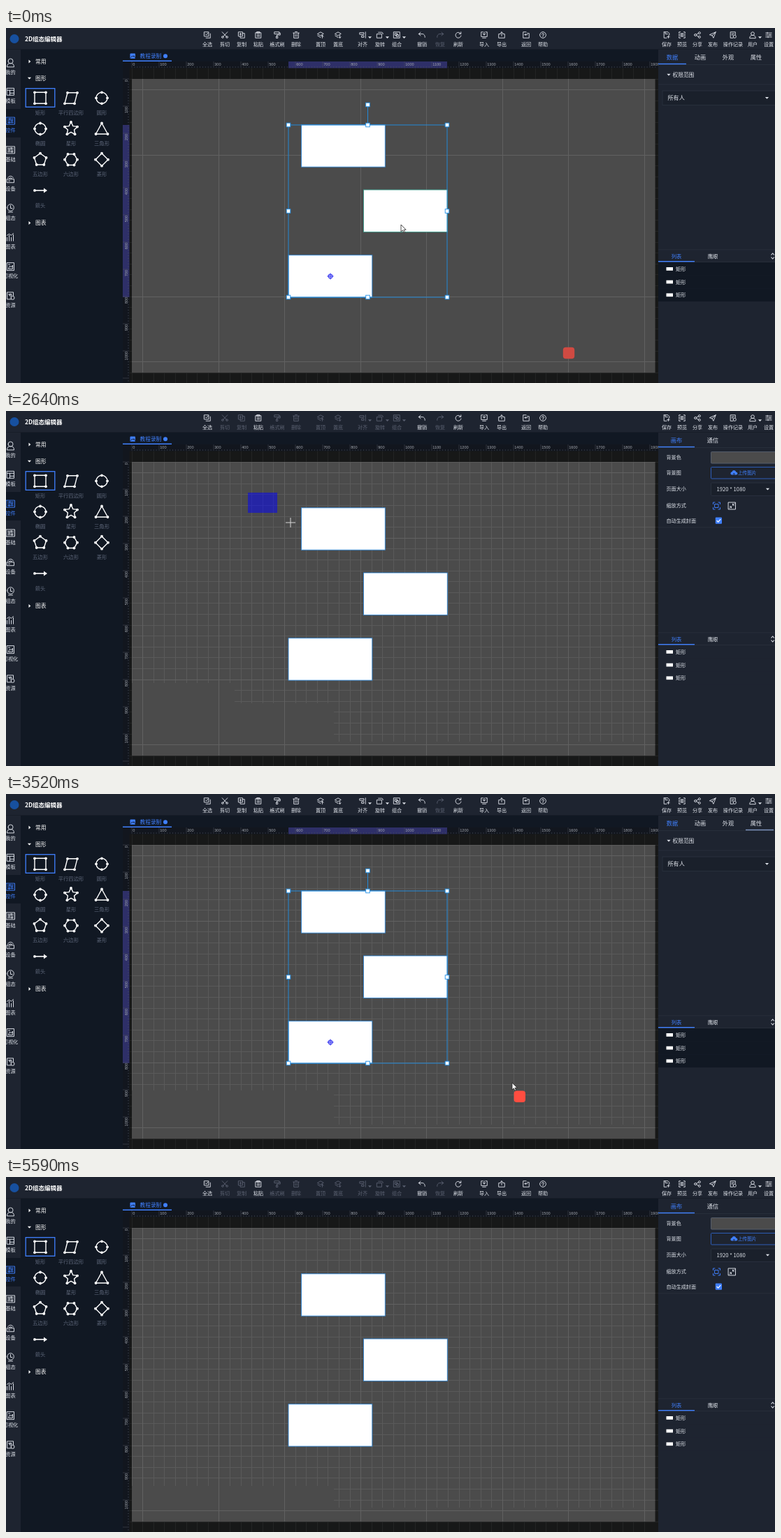
Write an HTML page that moves like this. It is 1100 px wide and 509 px high and loops after 6640 ms.

```html
<!DOCTYPE html>
<html lang="zh-CN">
<head>
<meta charset="utf-8">
<title>2D组态编辑器</title>
<style>
html, body { margin: 0; width: 100%; height: 100%; overflow: hidden; background: #1e2430; }
svg { display: block; width: 100vw; height: 100vh; }
text { font-family: "Noto Sans CJK SC", "Noto Sans CJK", "Noto Sans", sans-serif; }
.ruler text { font-family: "Liberation Sans", sans-serif; }
.icon { fill: none; stroke: #dfe3ea; stroke-width: .95; stroke-linejoin: round; stroke-linecap: round; }
</style>
</head>
<body>
<svg id="stage" viewBox="0 0 1100 509" preserveAspectRatio="none"></svg>
<script>
const BLUE = '#4080ff', BAR = '#1e2430', DARK = '#111823', INK = '#dfe3ea', MUTED = '#5d6679';
const LOOP = 6640, UNIT = 0.39, OX = 180, OY = 73, CELL = 15.6;

const rect = (x, y, w, h, fill, extra = '') =>
  `<rect x="${x}" y="${y}" width="${w}" height="${h}" fill="${fill}" ${extra}/>`;
const text = (x, y, s, size = 7.4, fill = INK, anchor = 'start', extra = '') =>
  `<text x="${x}" y="${y + size * .37}" font-size="${size}" fill="${fill}" text-anchor="${anchor}" ${extra}>${s}</text>`;
const mid = (x, y, s, size, fill) => text(x, y, s, size, fill, 'middle');
const path = (d, stroke, width = 1, fill = 'none') =>
  `<path d="${d}" stroke="${stroke}" stroke-width="${width}" fill="${fill}"/>`;
const ring = (x, y, r) => `M${x - r} ${y}a${r} ${r} 0 1 0 ${2 * r} 0a${r} ${r} 0 1 0 ${-2 * r} 0`;
const icon = (x, y, d, color = INK, s = 1) =>
  `<path class="icon" transform="translate(${x} ${y}) scale(${s})" style="stroke:${color}" d="${d}"/>`;
const group = (id, body, extra = '') => `<g id="${id}" ${extra}>${body}</g>`;
const range = n => [...Array(n).keys()];
const caret = (x, y, c = INK) => `<path d="M${x - 2.6} ${y - 1.3}h5.2l-2.6 2.8z" fill="${c}"/>`;

const tools = [
  [288, '全选', 'M-4.5-4.5h6.5v6.5h-6.5zM-2 4.5h6.5v-6.5M-3-1.5l1.5 1.5 2.5-3'],
  [313, '剪切', 'M-4-4.5L2.5 2.5M4-4.5L-2.5 2.5' + ring(-3.3, 3.2, 1.4) + ring(3.3, 3.2, 1.4), 1],
  [337, '复制', 'M-4.5-4.5h6v6.5h-6zM-2 2v2.5h6.5v-7h-3M-3-1.2h3M-1.5-2.7v3', 1],
  [361, '粘贴', 'M-4-3.5h8v8h-8zM-2-4.8h4v2.4h-4zM-2 0h4M-2 2h4'],
  [388, '格式刷', 'M-4-4.5h7v3h-7zM3-3h1.5v3h-5v2M-1.2 2h2v2.8h-2z', 1],
  [415, '删除', 'M-4.5-3h9M-1.5-4.8h3M-3.5-3v7.6h7v-7.6M-1.2-.8v3M1.2-.8v3', 1],
  [450, '置顶', 'M-4.5-1.8l4.5-2.6 4.5 2.6-4.5 2.6zM-4.5 1l4.5 2.8M2.7 4.6v-4m-1.6 1.6l1.6-1.6 1.6 1.6', 1],
  [475, '置底', 'M-4.5-1.8l4.5-2.6 4.5 2.6-4.5 2.6zM-4.5 1l4.5 2.8M2.7.6v4m-1.6-1.6l1.6 1.6 1.6-1.6', 1],
  [510, '对齐', 'M4.5-4.5v9M-4-3.5h6v2.6h-6zM-1 1h3v2.6h-3z', 2],
  [535, '旋转', 'M-4.5-1.5h7v6h-7zM-2.5-4h5q2 0 2 2.5', 2],
  [559, '组合', 'M-4.5-4.5h9v9h-9zM-2.5-2.5h3v3h-3zM-.5-.5h3v3h-3z', 2],
  [595, '撤销', 'M-2-4l-3 2.5 3 2.5M-5-1.5h6q3.5.5 3.5 5'],
  [621, '恢复', 'M2-4l3 2.5-3 2.5M5-1.5h-6q-3.5.5-3.5 5', 3],
  [647, '刷新', 'M3.6-2a4.2 4.2 0 1 0 .6 3M4-4.5v2.8h-2.8'],
  [684, '导入', 'M-2-4.5h-2.5v7h9v-7h-2.500M0-4.5v4.500m-2-2l2 2 2-2M-2.500 4.500h5'],
  [709, '导出', 'M-2-1.500h-2.500v6h9v-6h-2.500M0 1.500v-6m-2 2l2-2 2 2'],
  [744, '返回', 'M0-4.500h-4.500v9h9v-7h-3M2-.5h-4m1.500-1.500l-1.500 1.500 1.500 1.500'],
  [768, '帮助', ring(0, 0, 4.6) + 'M-1.500-1a1.500 1.500 0 1 1 1.500 1.600v.8M0 2.600v.2'],
  [945, '保存', 'M-4-4.500h6l2 2v3M0 4.500h-4v-9M-2-4.500v3h3.500M2.600 1v3.600M.8 2.800h3.600'],
  [967, '预览', 'M-5 0q5-5 10 0-5 5-10 0' + ring(0, 0, 1.5) + 'M-4.500-2.500v-2h2M4.500-2.500v-2h-2M-4.500 2.500v2h2M4.500 2.500v2h-2'],
  [989, '分享', ring(-3, 0, 1.6) + ring(3, -3, 1.6) + ring(3, 3, 1.6) + 'M-1.600-.7l3.200-1.600M-1.600.7l3.200 1.600'],
  [1011, '发布', 'M-4.500-.5l9-4-3.500 9-2-3.500zM-1 1l5.500-5.500'],
  [1040, '操作记录', 'M0 4.500h-4v-9h7.500v4M-2-2h3.500M-2 0h2' + ring(2.4, 2.4, 2.2)],
  [1068, '用户', ring(0, -2, 2.5) + 'M-4.500 4.500q0-4 4.500-4 4.500 0 4.500 4z', 4],
  [1091, '设置', 'M-4.500-3h9M-4.500 0h9M-4.500 3h9M-2-4v2M2-1v2M-1 2v2']
];

function toolbar(active) {
  return tools.map(([x, name, d, kind]) => {
    const off = kind === 3 || (!active && (kind === 1 || kind === 2));
    const c = off ? '#5a6070' : INK;
    return icon(x, 10, d, c, .95) + mid(x, 23.5, name, 7.1, c) +
      (kind === 2 || kind === 4 ? caret(x + 10.5, 13.5, c) : '');
  }).join('');
}

const rail = [
  ['我的', ring(0, -2, 3.5) + 'M-5 6q0-5 5-5t5 5z'],
  ['模板', 'M-5-5h10v10h-10zM-5-2h10M-1-2v7M-1 2h6'],
  ['控件', 'M-6-5h12v10h-12zM-4-2.500h8M-4 0h8M-4 2.500h8M-1-3.500v2M2-1v2M-2 1.500v2'],
  ['基础', 'M-6-5h12v10h-12zM-4-2.500h8M-4 0h8M-4 2.500h8M1-3.500v2M-2-1v2M2 1.500v2'],
  ['设备', 'M-5 0h10v5h-10zM-3 2.500h2M-4-2q4-5 8 0M-2-1q2-2 4 0'],
  ['组态', ring(0, -1, 4.8) + 'M0-4v4h2.500M-3 5.500h6'],
  ['图表', 'M-5 5v-5M-2 5v-8M1 5v-5M4 5v-9M-5-3l3-2 3 2 3-3'],
  ['可视化', 'M-5-5.500h10v11h-10zM-3 3l2-4 2 2 2-3v5zM-3-3h2'],
  ['资源', 'M1 5h-6v-10h9v5M-3-2h4' + ring(3, 3, 2.5) + ring(0, -1, 1.5)]
];

const polar = (n, r, a0 = -90) => range(n).map(i => {
  const a = (a0 + 360 * i / n) * Math.PI / 180;
  return [r * Math.cos(a), r * Math.sin(a)];
});
const dots = pts => pts.map(([x, y]) => `<circle cx="${x}" cy="${y}" r="1.9" fill="#fff"/>`).join('');
const poly = pts => `<polygon points="${pts.join(' ')}" fill="none" stroke="#fff" stroke-width="1.4"/>`;
const nodes = pts => poly(pts) + dots(pts);
const round = path(ring(0, 0, 8), '#fff', 1.4) + dots(polar(4, 8));
const star = polar(5, 10).flatMap((p, i) => [p, polar(5, 4.8, -54)[i]]);
const shapes = [
  ['矩形', nodes([[-8, -8], [8, -8], [8, 8], [-8, 8]])],
  ['平行四边形', nodes([[-5, -7.5], [9, -7.5], [5, 8], [-9, 8]])],
  ['圆形', round], ['椭圆', round],
  ['星形', poly(star) + dots(polar(5, 9.5))],
  ['三角形', nodes([[0, -8], [8.500, 7.500], [-8.500, 7.500]])],
  ['五边形', nodes(polar(5, 9))],
  ['六边形', nodes(polar(6, 9, 0))],
  ['菱形', nodes(polar(4, 9))],
  ['箭头', path('M-8 0H6', '#fff', 1.6) + dots([[-8, 0]]) + '<path d="M5-3.500L10 0 5 3.500z" fill="#fff"/>']
];

function leftSide() {
  let s = rect(0, 31, 21, 478, BAR) + rect(21, 31, 146, 478, DARK) + rect(0, 116, 21, 41, DARK);
  rail.forEach(([name, d], i) => {
    const y = 49.5 + 41.8 * i, c = i === 2 ? BLUE : INK;
    s += icon(6.5, y, d, c) + mid(6.5, y + 13.500, name, 7.2, c);
  });
  [['常用', 48], ['图形', 72], ['图表', 279.500]].forEach(([name, y], i) => {
    s += text(42, y, name, 7.800, '#fff') +
      (i === 1 ? caret(33.500, y, '#fff') : `<path d="M32.500 ${y - 2.600}v5.200l2.800-2.600z" fill="#fff"/>`);
  });
  s += rect(28.200, 86.700, 41.600, 26.600, 'none', `stroke="${BLUE}" stroke-width="1.3"`);
  shapes.forEach(([name, body], i) => {
    const x = 49 + 44 * (i % 3), y = 100.300 + 44.200 * Math.floor(i / 3);
    s += `<g transform="translate(${x} ${y})">${body}</g>` + mid(x, y + 21, name, 7.300, MUTED);
  });
  return s;
}

const vLine = (x, y0, y1) => `M${x} ${y0}V${y1}`;
const hLine = (y, x0, x1) => `M${x0} ${y}H${x1}`;
const px = v => Math.floor(v) + .5;

function board() {
  const cols = range(48).map(k => px(OX + CELL * k)), rows = range(28).map(k => px(OY + CELL * k));
  const border = cols.map(x => vLine(x, 57, 509)).join('') + rows.map(y => hLine(y, 176, 933)).join('');
  const strong = range(8).map(n => vLine(cols[Math.round(1 + 6.5 * n)], OY, 494)).join('') +
    [1, 7, 20, 26].map(k => hLine(rows[k], OX, 928.500)).join('');
  const fine = cols.map(x => vLine(x, OY, 494)).join('') + rows.map(y => hLine(y, OX, 928.500)).join('');
  return rect(167, 48, 766, 461, '#171818') + path(border, '#232424') +
    rect(OX, OY, 748.600, 421.200, '#4b4b4b') +
    `<clipPath id="shown"></clipPath><g clip-path="url(#shown)">${path(fine, '#5a5a5a')}</g>` +
    path(strong, '#616161');
}

function rulers() {
  let marks = '', labels = '';
  for (let u = 0; u <= 1920; u += 10) {
    const long = u % 100 === 0, x = OX + u * UNIT, y = OY + u * UNIT;
    marks += vLine(x, long ? 48 : 55, 57);
    if (y < 509) marks += hLine(y, long ? 167 : 174, 176);
    if (long) {
      labels += text(x + 1.200, 52.300, u, 5.600, '#a3a8b0');
      if (y < 500) labels += text(0, 0, u, 5.600, '#a3a8b0', 'end', `transform="translate(171.600 ${y + 1}) rotate(-90)"`);
    }
  }
  return `<g class="ruler">${rect(167, 48, 766, 9.500, '#12161e')}${rect(167, 48, 9.500, 461, '#12161e')}
    ${rect(0, 48, 0, 9.500, '#2e2f68', 'id="spanX"')}${rect(167, 0, 9.500, 0, '#2e2f68', 'id="spanY"')}
    ${path(marks, '#4d535e', .5)}${labels}</g>`;
}

const boxes = [[422.500, 138.800], [511.500, 232], [404, 325.700]];
const tab = (x, s, on) => mid(x, 42.300, s, 8.200, on ? BLUE : INK);
const rule = y => rect(933, y, 167, .8, '#2a313d');
const field = (y, h, fill, stroke) => rect(1008.500, y, 96, h, fill, `rx="1" stroke="${stroke}" stroke-width=".9"`);

const dataPanel = tab(953, '数据', 1) + tab(993, '动画') + tab(1033, '外观') + tab(1073, '属性') + rule(52) +
  rect(933, 50.800, 40, 1.400, BLUE, 'id="under"') + caret(948, 67) + text(953.500, 67, '权限范围', 7.700) + rule(80.500) +
  rect(939, 90, 165, 20.500, '#1a202b', 'stroke="#2b323f" stroke-width=".8"') +
  text(946.500, 100.300, '所有人', 8.100) + caret(1088.500, 100.300);

const pagePanel = tab(959, '画布', 1) + tab(1011, '通信') + rule(52) + rect(933, 50.800, 52, 1.400, BLUE) +
  [['背景色', 66.500], ['背景图', 88.300], ['页面大小', 111.700], ['缩放方式', 135.300], ['自动生成封面', 157]]
    .map(([s, y]) => text(944.500, y, s, 7.100)).join('') +
  field(58.500, 16.500, '#4b4b4b', '#596070') + field(80.500, 16.500, 'none', '#2f62c4') +
  '<path d="M1038 91.500a2.200 2.200 0 0 1 .5-4.300 3 3 0 0 1 5.800.3 2 2 0 0 1 .2 4z" fill="#4080ff"/>' +
  path('M1041.300 93v-3.800m-1.300 1.300l1.300-1.300 1.300 1.300', BAR, .8) +
  text(1047, 88.600, '上传图片', 6.600, BLUE) +
  field(103, 18.500, '#1a202b', '#2b323f') + text(1016.500, 112.200, '1920 * 1080', 7.700) + caret(1089.500, 112) +
  icon(1016.500, 136, 'M-5-2.500v-2.500h2.500M5-2.500v-2.500h-2.500M-5 2.500v2.500h2.500M5 2.500v2.500h-2.500M-2.500-2.500h5v5h-5z', BLUE) +
  icon(1038.500, 136, 'M-5-5h10v10h-10zM1-1l2.500-2.500M1-3v2h2M-1 1l-2.500 2.500M-1 3v-2h-2', INK) +
  rect(1014.800, 152.500, 9.200, 9.200, BLUE, 'rx="1"') + path('M1016.700 157l2 2.100 3.500-4', '#fff', 1.200) + rule(166.500);

const listHead = rule(317.500) + rule(335) + rect(933, 334, 52, 1.400, BLUE) +
  mid(959, 327, '列表', 7.300, BLUE) + mid(1011, 327, '鹰眼', 7.300) +
  path('M1094.500 325.500l2.200-2.500 2.200 2.500M1094.500 328.500l2.200 2.500 2.200-2.500', INK, 1.100);
const listRows = range(3).map(i => {
  const y = 336 + 18.700 * i;
  return rect(933, y, 167, 18.700, DARK, `id="row${i}"`) + rect(944.500, y + 7, 9.500, 4.800, '#fff') +
    text(958, y + 9.300, '矩形', 7.300);
}).join('');

const stage = document.getElementById('stage');
stage.innerHTML = rect(0, 0, 1100, 509, BAR) + board() +
  boxes.map(([x, y], i) => rect(x, y, 119.800, 60.400, '#fff', `id="box${i}" stroke-width=".9"`)).join('') +
  group('pick', '') + group('band', rect(346, 117, 0, 0, '#00f', 'fill-opacity=".5"')) + rulers() +
  rect(0, 0, 1100, 31, BAR) + rect(0, 30.500, 1100, .8, '#121721') + '<circle cx="12" cy="15.500" r="6.500" fill="#17509f"/>' +
  text(27, 15.500, '2D组态编辑器', 8.500, '#fff', 'start', 'font-weight="700"') +
  group('barOn', toolbar(true)) + group('barOff', toolbar(false)) +
  rect(167, 31, 766, 17, DARK) + rect(167, 46.500, 70, 1.500, BLUE) +
  rect(177.500, 36.500, 7.500, 7.200, BLUE, 'rx="1"') + path('M178.500 42.500l2-2.600 1.300 1.300 1.200-1.500 1.500 2.800', DARK, .9) +
  text(191.500, 40.300, '教程录制', 7.700, BLUE) + '<circle cx="228" cy="40.300" r="3" fill="#4080ff"/>' +
  leftSide() + rect(933, 31, 167, 478, BAR) + group('dataPanel', dataPanel) + group('pagePanel', pagePanel) +
  listHead + listRows + rect(-8.200, -8.200, 16.400, 16.400, '#ff4d40', 'id="badge" rx="4"') +
  group('cross', path('M-7 0H7M0-7V7', '#d8d8d8')) +
  group('arrow', path('M0 0V10L2.300 7.900 3.900 11.300 5.500 10.600 4 7.300H7.200Z', '#222', .8, '#fff'));

const $ = id => document.getElementById(id);
const show = (id, on) => $(id).setAttribute('display', on ? 'inline' : 'none');
const set = (el, o) => { for (const k in o) el.setAttribute(k, o[k]); };

// time, x, y of each pointer step; the pointer holds between steps
const pointer = [
  [0, 565, 282], [630, 565, 283], [780, 566, 285], [1030, 567, 287], [1180, 585, 300], [1320, 668, 334],
  [1440, 716, 357], [1560, 725, 361], [1680, 728, 363], [1830, 721, 359], [1980, 480, 190], [2100, 279, 82],
  [2250, 276, 76], [2370, 296, 90], [2490, 328, 112], [2640, 407, 160], [2760, 512, 243], [2880, 606, 322],
  [3010, 676, 381], [3130, 714, 408], [3270, 724, 414], [3640, 701, 398], [3760, 672, 390], [3900, 600, 372],
  [4020, 540, 359], [4140, 508, 352], [4260, 496, 351], [4560, 501, 350], [4710, 580, 361], [4840, 655, 368],
  [4960, 690, 370], [5230, 740, 350], [5350, 870, 310], [5470, 1010, 270], [5590, -50, -50]
];
// time, selection x0, y0, x1, y1, pivot box, selected boxes
const picks = [
  [0, 404, 139, 631, 386, 2, [0, 1, 2]], [120, 404, 139, 542.500, 386, 2, [0, 2]], [1830],
  [3520, 404, 139, 631, 386, 2, [0, 1, 2]], [4410, 422.500, 139, 631, 292, 1, [0, 1]], [5110]
];
// time and area in which the fine grid has been repainted
const painted = [
  [120, 469, 57, 464, 417], [1830, 167, 57, 766, 333], [2640, 327, 111, 393, 308],
  [3520, 167, 57, 766, 368], [4410, 167, 57, 766, 386]
];
const last = (list, t) => list.filter(k => k[0] <= t).pop();

function drawPick([, x0, y0, x1, y1, pivot, chosen = []]) {
  const on = chosen.length > 0;
  ['barOn', 'dataPanel'].forEach(id => show(id, on));
  ['barOff', 'pagePanel'].forEach(id => show(id, !on));
  range(3).forEach(i => show('row' + i, true) || set($('row' + i), { fill: chosen.includes(i) ? DARK : BAR }));
  set($('spanX'), { x: x0 || 0, width: on ? x1 - x0 : 0 });
  set($('spanY'), { y: y0 || 0, height: on ? y1 - y0 : 0 });
  if (!on) { $('pick').innerHTML = ''; return; }
  const mx = (x0 + x1) / 2, my = (y0 + y1) / 2;
  const cx = boxes[pivot][0] + 60, cy = boxes[pivot][1] + 30.200;
  const grips = [[x0, y0], [mx, y0], [x1, y0], [x0, my], [x1, my], [x0, y1], [mx, y1], [x1, y1], [mx, 110]];
  $('pick').innerHTML = path(`M${x0} ${y0}H${x1}V${y1}H${x0}ZM${mx} 110V${y0}`, '#2389d8') +
    grips.map(([x, y]) => rect(x - 2.800, y - 2.800, 5.600, 5.600, '#fff', 'stroke="#1e90ea" stroke-width=".9"')).join('') +
    path(ring(cx, cy, 2.800) + `M${cx - 4.500} ${cy}h9M${cx} ${cy - 4.500}v9`, '#3c3cf0', 1.100);
}

function draw(t) {
  drawPick(last(picks, t));
  $('shown').innerHTML = painted.filter(a => a[0] <= t).map(a => rect(a[1], a[2], a[3], a[4], '#fff')).join('');

  const [, x, y] = last(pointer, t), crossed = t >= 2640 && t < 3130;
  show('cross', crossed);
  show('arrow', !crossed);
  set($(crossed ? 'cross' : 'arrow'), { transform: `translate(${x} ${y})` });

  // the marquee trails the pointer a little
  const drag = t >= 2640 && t < 3520, lagX = t < 2760 ? 19 : 13, lagY = t < 2760 ? 14 : 9;
  show('band', drag);
  if (drag) set($('band').firstChild, { width: x - lagX - 346, height: y - lagY - 117 });

  const hover = t < 1180 ? 1 : t >= 4410 && t < 4710 ? 2 : -1;
  range(3).forEach(i => set($('box' + i), { stroke: i === hover ? '#3a9a8a' : '#2f84d2' }));

  const late = t >= 3520 && t < 4410;
  show('badge', t < 120 || late);
  set($('badge'), {
    transform: late ? 'translate(734.800 433.800)' : 'translate(805 466)',
    fill: late && t < 3900 ? '#ff4d40' : '#d04a42'
  });
  const slide = t >= 3520 && t < 3900;
  set($('under'), {
    x: !slide ? 933 : t < 3640 ? 1058 : t < 3760 ? 1006 : 940,
    fill: slide ? '#7f95c0' : BLUE
  });
}

const start = performance.now();
function tick() {
  draw((performance.now() - start) % LOOP);
  requestAnimationFrame(tick);
}
tick();
</script>
</body>
</html>
```
